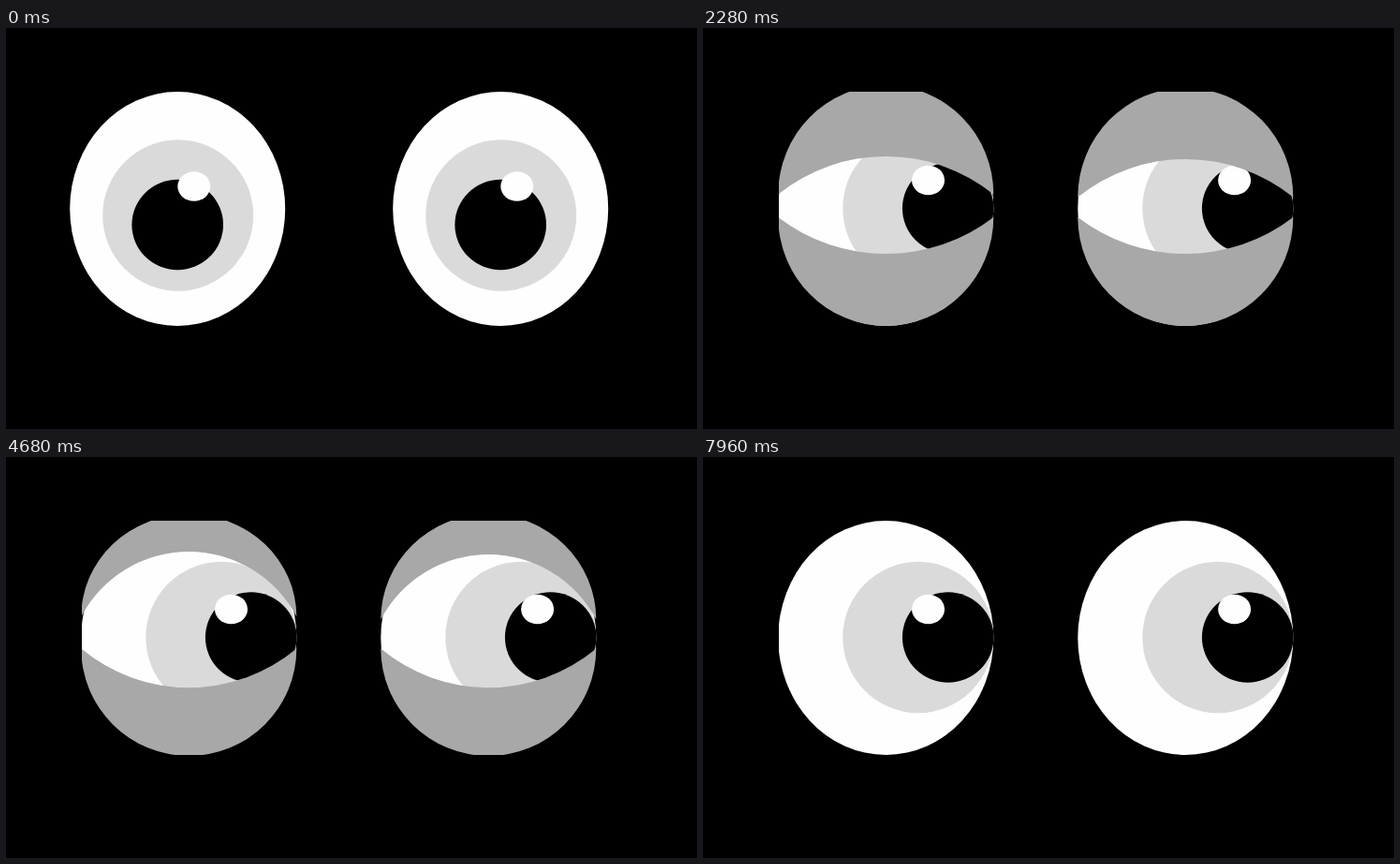
These frames come from a looping animation (738 by 428 pixels, 8 s). An HTML page:

```html
<!DOCTYPE html>
<html lang="en">
<head>
<meta charset="utf-8">
<title>Blinking eyes</title>
<style>
html, body { margin: 0; width: 100%; height: 100%; overflow: hidden; background: #000; }
svg { display: block; width: 738px; height: 428px; }
</style>
</head>
<body>
<svg id="stage" viewBox="0 0 738 428" xmlns="http://www.w3.org/2000/svg"></svg>
<script>
const STEP = 40, LOOP = 8000;
const BALL = { y: 193, rx: 115, ry: 125 };
const WHITE = '#fefefe', IRIS = '#dadada', LID = '#a8a8a8';

// Offsets are from the eye's centre; lid values are heights of the half-shut lids.
const POSES = {
  centre: { cx: [183.2, 528.2], iris: [.5, 200], pupil: [0, 210], glint: [17.6, 17.6, 169],
            tilt: [14, 6], low: [193, 234], lowFill: '#b8b8b8', sheer: true, widen: 0 },
  left:   { cx: [195.3, 515.3], iris: [-27, 192.5], pupil: [-58.8, 201.2], glint: [-41.3, -41.3, 177.5],
            tilt: [-1, 7], low: [203, 242], lowFill: LID, sheer: false, widen: 5 },
  right:  { cx: [195.3, 515.3], iris: [34.5, 192.5], pupil: [66.4, 192.5], glint: [45.2, 52.3, 162.5],
            tilt: [-1, 2], low: [202, 241], lowFill: LID, sheer: false, widen: 5 }
};

// Each blink: start time, pose before and after, extra steps spent half open.
const BLINKS = [
  [80, 'centre', 'left', 4],
  [760, 'left', 'left', 5],
  [1200, 'left', 'right', -2],
  [2280, 'right', 'centre', 0],
  [3360, 'centre', 'left', 0],
  [4440, 'left', 'right', -2],
  [5520, 'right', 'centre', 2],
  [6600, 'centre', 'left', 0],
  [7680, 'left', 'right', -2]
];
// 1 is shut, 0 half open, below 0 nearly open.
const SHUT = [0, .5, 1, 1, .5, 0, 0, -.2, -.4];
const BOB = [0, 4, 4, 0, -4, -4, -4, -2, 0];

const stage = document.getElementById('stage');

function add(parent, tag, attrs) {
  const el = document.createElementNS('http://www.w3.org/2000/svg', tag);
  set(el, attrs);
  parent.appendChild(el);
  return el;
}
function set(el, attrs) {
  for (const name in attrs) el.setAttribute(name, attrs[name]);
}

function makeEye(side) {
  const box = add(add(stage, 'clipPath', { id: 'box' + side }), 'rect', {});
  const lowClip = add(add(stage, 'clipPath', { id: 'low' + side }), 'path', {});
  const group = add(stage, 'g', { 'clip-path': `url(#box${side})` });
  const oval = (parent, fill, rx, ry) => add(parent, 'ellipse', { fill, rx, ry });
  const eye = { side, box, lowClip };
  eye.ball = oval(group, WHITE, BALL.rx, BALL.ry);
  eye.iris = oval(group, IRIS, 80.5, 80.7);
  eye.pupil = oval(group, '#000', 48.8, 48.2);
  eye.glint = oval(group, WHITE, 17.5, 15.8);
  eye.low = add(group, 'path', {});
  eye.sheer = add(group, 'g', { 'clip-path': `url(#low${side})` });
  eye.dimIris = oval(eye.sheer, '#b0b0b0', 80.5, 80.7);
  eye.dimPupil = oval(eye.sheer, '#848484', 48.8, 48.2);
  eye.up = add(group, 'path', { fill: LID });
  return eye;
}
const eyes = [makeEye(0), makeEye(1)];

function stateAt(time) {
  let now = BLINKS[0];
  for (const blink of BLINKS) if (blink[0] <= time) now = blink;
  const [start, from, to, hold] = now;
  if (time < start) return { pose: POSES[from], bob: 0, shut: null };
  let k = Math.floor((time - start) / STEP);
  if (k > 5) k = Math.max(5, k - hold);
  if (k >= SHUT.length) return { pose: POSES[to], bob: 0, shut: null };
  const bob = from === to ? Math.abs(BOB[k]) : BOB[k];
  return { pose: POSES[k < 3 ? from : to], bob, shut: SHUT[k] };
}

// A lid is half an ellipse, closed by a circular arc through the middle height.
function lidPath(cx, rx, corner, mid, tip) {
  const sag = Math.max(.01, Math.abs(corner - mid));
  const radius = (rx * rx + sag * sag) / (2 * sag);
  const bend = mid < corner ? 1 : 0;
  const sweep = tip < corner ? 0 : 1;
  return `M${cx - rx} ${corner}A${radius} ${radius} 0 0 ${bend} ${cx + rx} ${corner}` +
    `A${rx} ${Math.abs(corner - tip)} 0 0 ${sweep} ${cx - rx} ${corner}Z`;
}

function drawEye(eye, { pose, bob, shut }) {
  const cx = pose.cx[eye.side];
  const place = (el, dx, y) => set(el, { cx: cx + dx, cy: y + bob });
  place(eye.ball, 0, BALL.y);
  place(eye.iris, ...pose.iris);
  place(eye.dimIris, ...pose.iris);
  place(eye.pupil, ...pose.pupil);
  place(eye.dimPupil, ...pose.pupil);
  place(eye.glint, pose.glint[eye.side], pose.glint[2]);

  const closed = Math.max(0, shut || 0);
  const rx = BALL.rx + pose.widen * closed;
  const edge = cx - rx;
  const reach = Math.abs(bob);
  set(eye.box, {
    x: pose.widen && !eye.side ? edge + .7 : edge - 1, y: 68 - reach,
    width: 2 * rx + 2, height: 250 + 2 * reach
  });

  const lidded = shut !== null;
  const show = visible => ({ display: visible ? 'inline' : 'none' });
  set(eye.up, show(lidded));
  set(eye.low, show(lidded));
  set(eye.sheer, show(lidded && pose.sheer));
  if (!lidded) return;

  const tilt = pose.tilt[eye.side] * (1 - closed);
  const mix = (half, full) => half + (full - half) * shut;
  const top = BALL.y - BALL.ry + bob, bottom = BALL.y + BALL.ry + bob;
  const upMid = mix(138, 228) + tilt + bob;
  const upCorner = mix(178.5, 196) + tilt + bob;
  const lowCorner = mix(pose.low[0], 196) + bob;
  const lowMid = mix(pose.low[1], 228) + bob;
  const upTip = Math.max(top - 7, Math.min(top, upMid - 76));
  const lowTip = Math.max(bottom, Math.min(bottom + 1, lowMid + 77));
  const low = lidPath(cx, rx, lowCorner, lowMid, lowTip);
  set(eye.up, { d: lidPath(cx, rx, upCorner, upMid, upTip) });
  set(eye.low, { d: low, fill: pose.lowFill });
  set(eye.lowClip, { d: low });
}

function draw(time) {
  const state = stateAt(time);
  for (const eye of eyes) drawEye(eye, state);
}

const begin = performance.now();
function tick() {
  draw((performance.now() - begin) % LOOP);
  requestAnimationFrame(tick);
}
draw(0);
requestAnimationFrame(tick);
</script>
</body>
</html>
```
